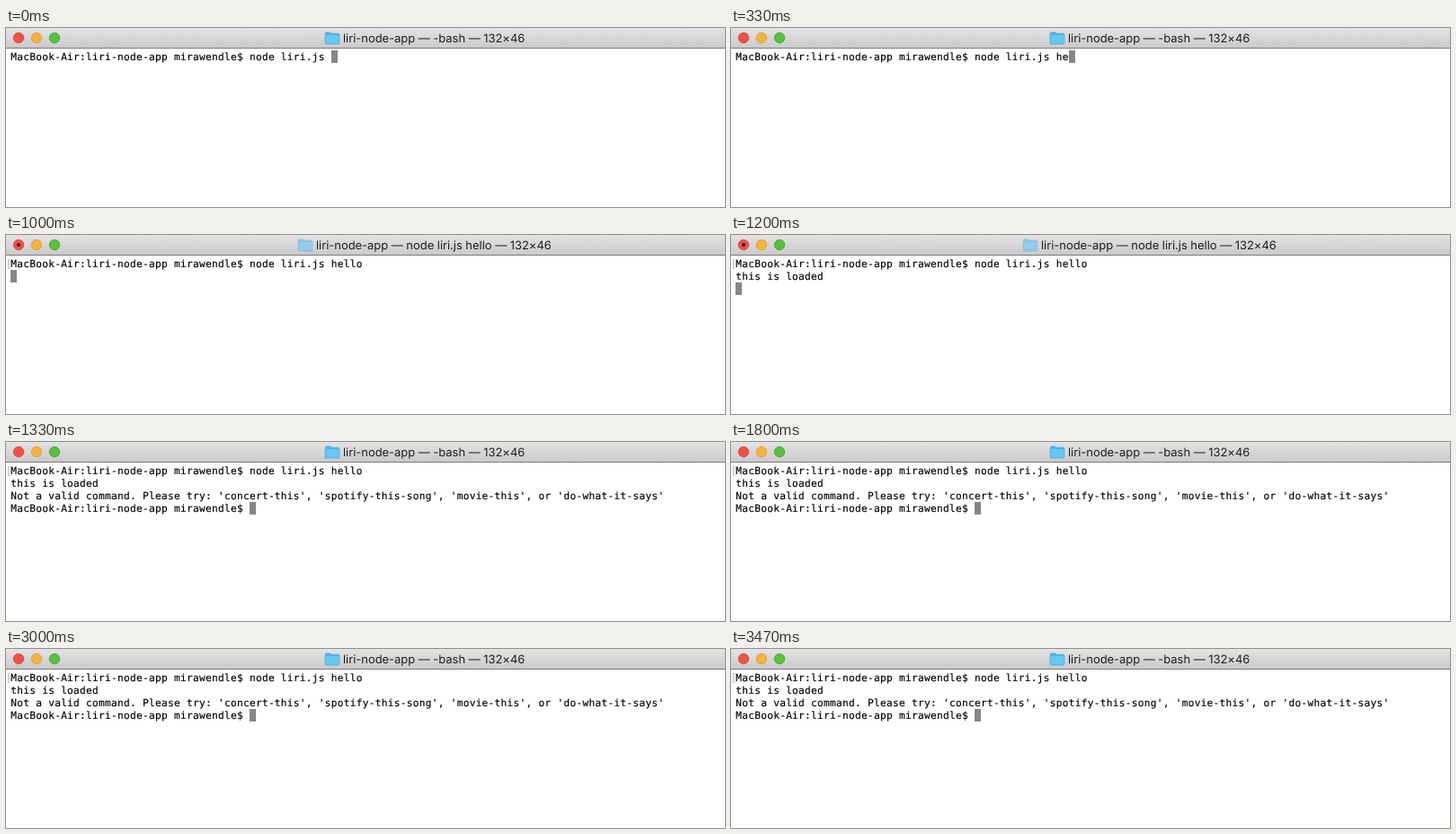
An HTML page for the animation above (3540 ms loop, 800 by 200 pixels).

```html
<!DOCTYPE html>
<html lang="en">
<head>
<meta charset="utf-8">
<title>Terminal</title>
<style>
html, body { margin: 0; width: 100%; height: 100%; overflow: hidden; background: #fff; }
svg { display: block; }
text { white-space: pre; text-rendering: geometricPrecision; }
#lines text { font: 11.2px "DejaVu Sans Mono", monospace; letter-spacing: .257px; fill: #000; stroke: #000; stroke-width: .15; }
#title { font: 13px Inter, sans-serif; letter-spacing: -.04px; fill: #1f1f1f; }
</style>
</head>
<body>
<svg width="800" height="200" viewBox="0 0 800 200">
  <defs>
    <linearGradient id="bar" x2="0" y2="1">
      <stop stop-color="#e4e2e4"/>
      <stop offset="1" stop-color="#cbc9cb"/>
    </linearGradient>
  </defs>
  <rect width="800" height="200" fill="#fff"/>
  <rect width="800" height="22" fill="url(#bar)"/>
  <rect y="22" width="800" height="1" fill="#7c7a7c"/>
  <circle cx="14" cy="11" r="5.75" fill="#f05147" stroke="#d5443a" stroke-width=".8"/>
  <circle cx="34" cy="11" r="5.75" fill="#f6b23b" stroke="#d6982f" stroke-width=".8"/>
  <circle cx="54" cy="11" r="5.75" fill="#57c13b" stroke="#42a32b" stroke-width=".8"/>
  <circle id="busy" cx="14" cy="11" r="2" fill="#4d0000"/>
  <g id="heading">
    <g id="folder" stroke="#45a6d6" stroke-width=".5">
      <path d="M.2 6q0-1.3 1.3-1.3h4l1.5 1.3h7.5q1.3 0 1.3 1.5v9q0 1.3-1.3 1.3h-13q-1.3 0-1.3-1.3z" fill="#4fb4e6"/>
      <path d="M.2 7.5h15.6v9q0 1.3-1.3 1.3h-13q-1.3 0-1.3-1.3z" fill="#64c7f4"/>
    </g>
    <text id="title" x="20" y="16"></text>
  </g>
  <path id="mark" d="M4.5 27.5h-2v10h2" fill="none" stroke="#b8b8b8"/>
  <rect id="cursor" width="7" height="14" fill="#868686"/>
  <g id="lines">
    <text x="5.2" y="36"></text>
    <text x="5.2" y="50"></text>
    <text x="5.2" y="64"></text>
    <text x="5.2" y="78"></text>
  </g>
</svg>
<script>
const LOOP = 3540, CHAR = 7, ROW = 14;
const PROMPT = 'MacBook-Air:liri-node-app mirawendle$ ';
const KEYS = [200, 330, 470, 600, 670];
const ENTER = 870, RUN = 1000, LOADED = 1130, OUTPUT = 1270, DONE = 1330;
const $ = id => document.getElementById(id);
const rows = [...$('lines').children];

function screen(t) {
  const typed = KEYS.filter(key => t >= key).length;
  const lines = [PROMPT + 'node liri.js ' + 'hello'.slice(0, typed)];
  if (t >= LOADED) lines.push('this is loaded');
  if (t >= OUTPUT) {
    lines.push("Not a valid command. Please try: 'concert-this', 'spotify-this-song', 'movie-this', or 'do-what-it-says'");
    lines.push(PROMPT);
  } else if (t >= ENTER) lines.push('');
  return lines;
}

function draw(t) {
  const lines = screen(t), last = lines.length - 1;
  rows.forEach((row, i) => row.textContent = lines[i] || '');
  $('cursor').setAttribute('x', 5 + CHAR * lines[last].length);
  $('cursor').setAttribute('y', 25 + ROW * last);

  const running = t >= RUN && t < DONE;
  $('title').textContent = `liri-node-app — ${running ? 'node liri.js hello' : '-bash'} — 132×46`;
  $('heading').setAttribute('transform', `translate(${running ? 325 : 355})`);
  $('folder').setAttribute('opacity', running ? .6 : 1);
  $('busy').setAttribute('opacity', running ? 1 : 0);
  $('mark').setAttribute('opacity', t >= ENTER ? 1 : 0);
}

const start = performance.now();
function tick() {
  draw((performance.now() - start) % LOOP);
  requestAnimationFrame(tick);
}
tick();
</script>
</body>
</html>
```
